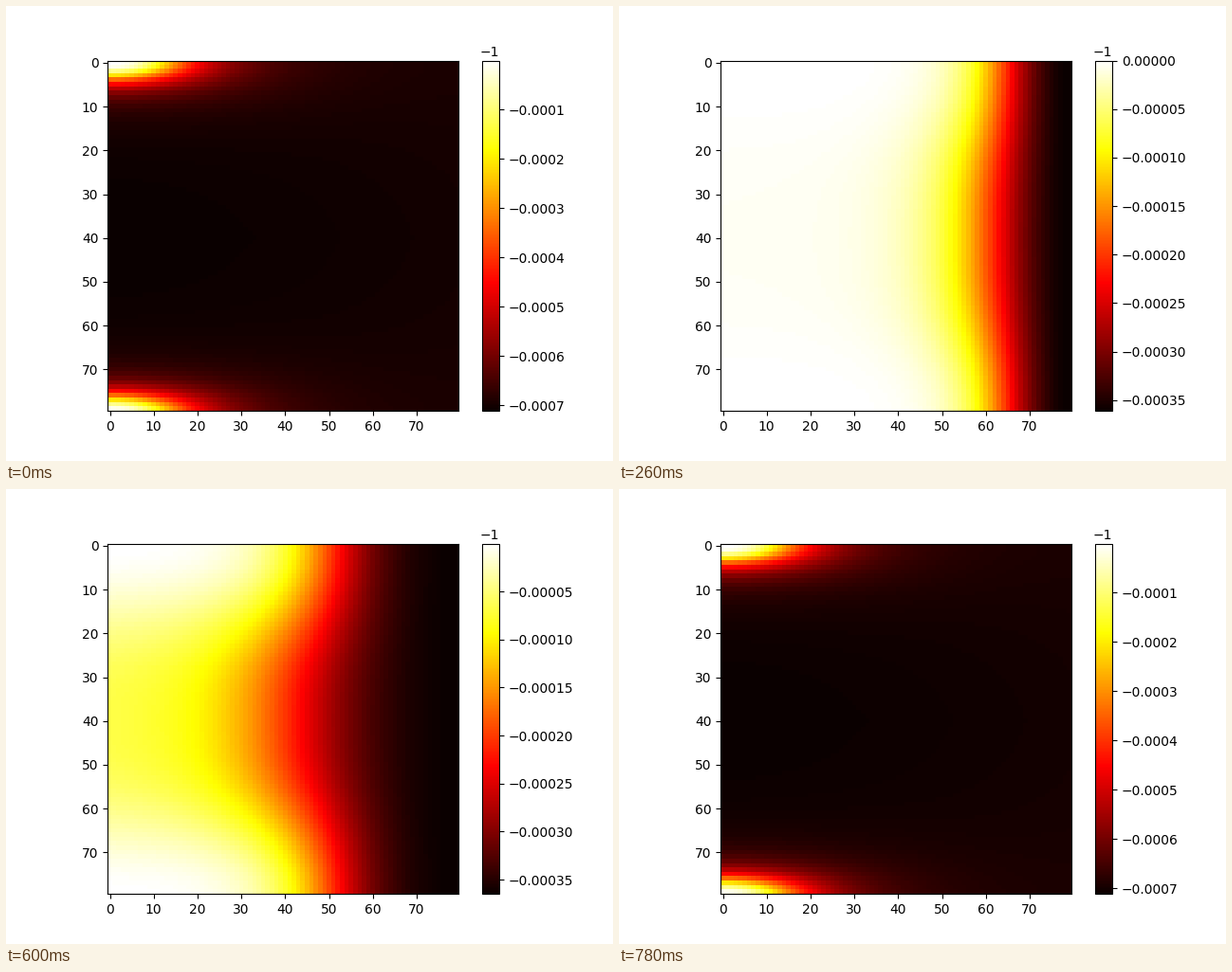
A matplotlib script that plays this animation: 640x480 px, repeating every 0.8 s.

```python
import numpy as np
import matplotlib.pyplot as plt
from matplotlib.animation import FuncAnimation

N = 80
STATES = 20          # played forward, then backward
MERGE_START, MERGE_END = 3, 9

rows, x = np.mgrid[0:N, 0:N].astype(float)
y = np.minimum(rows, N - rows)             # the field is periodic in y
edge_weight = np.abs(np.cos(np.pi * y / N)) ** 3

# Front position and width along the edges and the middle row, and total depth
FRONT_TIMES = [9, 14, 17, 19]
EDGE_POS, EDGE_WIDTH = [49.5, 68.2, 75.1, 78.2], [7, 4.8, 3.4, 2.2]
MID_POS, MID_WIDTH = [42.5, 67.2, 74.8, 78], [10.5, 6.4, 3.6, 2.3]
FRONT_DEPTH = [3.65e-4, 3.604e-4, 3.56e-4, 3.52e-4]


def sigmoid(u):
    return 1 / (1 + np.exp(-u))


def profile(pos, width):
    """A soft step from 1 to 0 that flattens out at the right wall."""
    mirrored = 2 * N - 1 - x
    step = sigmoid((pos - x) / width) + sigmoid((pos - mirrored) / width)
    return (step - step.min()) / (1 - step.min())


def blob(t):
    """Elliptic spots growing from the left corners, with a faint glow on the right."""
    radius = 4.15 + 1.2 * t - .036 * t ** 2
    glow = .015 * (1 + min(t, MERGE_START))
    rho = np.hypot(y, x / 4)
    return 1 / (1 + (rho / radius) ** 2.8) + glow * (x / N) ** 1.5


def front(t):
    """A front moving right, ahead along the top and bottom edges."""
    def at(keys):
        return np.interp(t, FRONT_TIMES, keys)

    edge = profile(at(EDGE_POS), at(EDGE_WIDTH))
    mid = profile(at(MID_POS), at(MID_WIDTH))
    mid *= 1 - .17 * np.exp(-(max(t, MERGE_END) - MERGE_END) / 1.5)
    return mid + (edge - mid) * edge_weight


def log_deficit(field, depth, floor):
    field = (field - field.min()) / np.ptp(field)
    return np.log(floor + (depth - floor) * (1 - field))


def values(t):
    """Spots first, then a front; they merge on a logarithmic scale."""
    floor = 1e-6 * np.exp(-t / 4)
    blob_depth = np.interp(t, [0, MERGE_START], [7.11e-4, 7.205e-4])
    front_depth = np.interp(t, FRONT_TIMES, FRONT_DEPTH)
    part = np.clip((t - MERGE_START) / (MERGE_END - MERGE_START), 0, 1) ** 1.5
    deficit = np.exp((1 - part) * log_deficit(blob(t), blob_depth, floor)
                     + part * log_deficit(front(t), front_depth, floor))
    if t >= 13:                            # the plateau has reached -1
        deficit -= deficit.min()
    return -1 - deficit


fig, ax = plt.subplots(figsize=(6.4, 4.8), dpi=100)
image = ax.imshow(values(0), cmap="hot")
fig.colorbar(image, ax=ax)


def update(frame):
    data = values(min(frame, 2 * STATES - 1 - frame))
    image.set_data(data)
    image.set_clim(data.min(), data.max())
    return [image]


anim = FuncAnimation(fig, update, frames=2 * STATES, interval=20,
                     repeat=True, repeat_delay=0)
plt.show()
```
